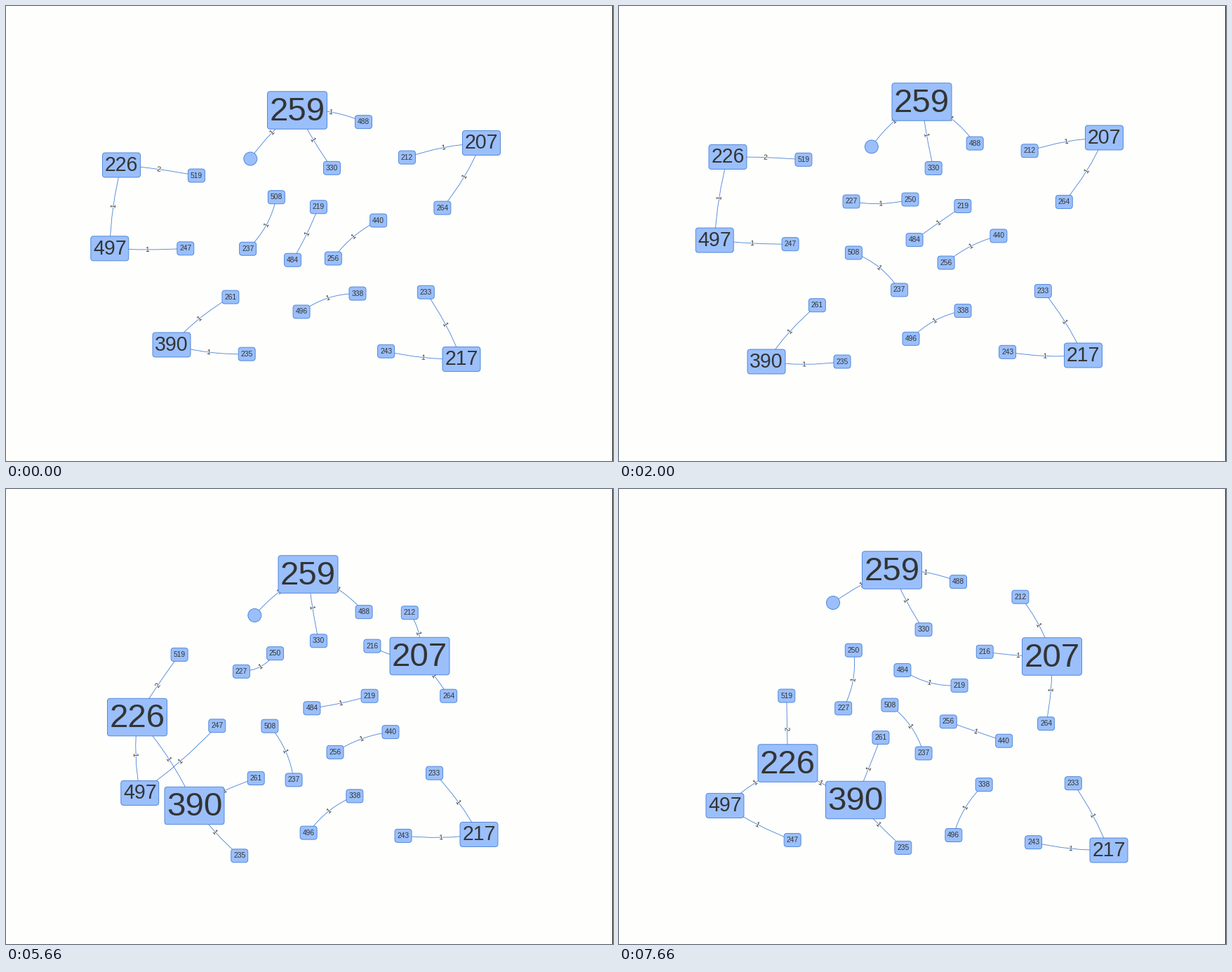
Animation, 865 px wide and 648 px high, one loop 8 s. Source, as a matplotlib script:

```python
import math
import numpy as np
import matplotlib.pyplot as plt
from matplotlib.animation import FuncAnimation
from matplotlib.patches import Circle, FancyBboxPatch, PathPatch, Rectangle
from matplotlib.path import Path
from matplotlib.patheffects import withStroke

W, H, DPI = 865, 648, 100
LOOP_MS, TICKS, STEPS = 8000, 100, 24
PT = 72 / DPI
FILL, LINE, INK, PAPER = "#9abffb", "#4a82d6", "#343434", "#fefefd"
CENTRE = np.array([W, H]) / 2

# Steps at which a new pair and two new links join the network.
PAIR_ADDED, LINKS_ADDED = 1, 16
# Poses: 0 start, 1 spread out, 2 pulled in, 3 late, 4 end.
PULLED, LAST = 2, 4

# Box width, box height, font size and link length in pixels.
SMALL, MID, BIG = (24, 19, 10.2, 84), (54, 35, 28.5, 108), (85, 53.5, 47.5, 96)

nodes, links = {}, []


def node(name, size=SMALL, grown=None, start=0, **place):
    nodes[name] = dict(size=size, grown=grown or size, start=start, **place)


def hub(name, *path, **kind):
    node(name, path=path, **kind)


def leaf(parent, name, *angles, slack=1, label="1", **kind):
    """Hang a node on its parent; slack scales the link while pulled in."""
    node(name, parent=parent, angles=angles, slack=slack, **kind)
    links.append((parent, name, label, nodes[name]["start"]))


def pair(a, b, angles, *path, start=0, slack=1):
    """Two equal nodes turning about the middle of their link."""
    hub(a, *path, start=start, twin=True)
    leaf(a, b, *angles, start=start, slack=slack)


hub("259", (415, 148.5), (431.5, 136.5), (430.5, 121.5), (398.5, 116.5), (389, 115.5), size=BIG)
leaf("259", "", 134, 151)
leaf("259", "488", 10, 38, 34, 17, 10)
leaf("259", "330", 59, 80, 81, 68, 62)

hub("226", (164.5, 226.5), (155, 215), (187, 325), (202, 382), (240.5, 390.5), size=MID, grown=BIG)
leaf("226", "519", 8, 2, -56, -70, -91, slack=1.12, label="2")
leaf("226", "497", 98, 99, 88, 77, 146, size=MID)
leaf("497", "247", 0, 3, -41, -51, 27, slack=1.35)

hub("207", (677.5, 195), (691.5, 187.5), (589.5, 238), (606, 240.5), (617, 238.5), size=MID, grown=BIG)
leaf("207", "212", 169, 170, 257, 257, 242, slack=.66)
leaf("207", "264", 121, 122, 54, 85, 95, slack=.73)
leaf("207", "216", 190, 190, 192, 172, 184, slack=.72, start=LINKS_ADDED)

hub("390", (236, 482.5), (210, 506.5), (268.5, 451), (317, 466), (337, 443), size=MID, grown=BIG)
leaf("390", "261", -39, -48, -24, -50, -68)
leaf("390", "235", 7, 0, 48, 47, 45)
links.append(("226", "390", "1", LINKS_ADDED))

hub("217", (649, 503), (674, 492), (698, 514.5), size=MID)
leaf("217", "233", 242, 234, 242)
leaf("217", "243", 186, 179, 186)

pair("508", "237", (119, 39, 66, 42, 55),
     (365, 309), (367, 378), (393, 376), (401, 361), (410, 342))
pair("219", "484", (116, 145, 168, 190, 195),
     (427, 324), (455.5, 309), (477, 303.5), (448.5, 297), (444.5, 269))
pair("440", "256", (140, 153, 160, 195, 199), (498.5, 332.5), (508.5, 360.5), (509, 345))
pair("496", "338", (-18, -59),
     (461, 422.5), (453, 454), (464, 463.5), (478.5, 471), (498.5, 457))
pair("227", "250", (24, -80),
     (388, 270), (373, 277), (359.5, 247), (341, 258.5), (327, 271),
     start=PAIR_ADDED, slack=.65)

plt.rcParams["font.family"] = "Liberation Sans"
fig = plt.figure(figsize=(W / DPI, H / DPI), dpi=DPI, facecolor=PAPER)
ax = fig.add_axes([0, 0, 1, 1])
ax.set(xlim=(0, W), ylim=(H, 0))
ax.axis("off")
fig.add_artist(Rectangle((864 / W, 0), 1 / W, 1, color="#1c1c1c", lw=0,
                         transform=fig.transFigure))
HALO = [withStroke(linewidth=1.5 * PT, foreground=PAPER)]


def pose_at(step):
    if step < LINKS_ADDED:
        return 1 - math.exp(-1.2 * step)
    return np.interp(step, [16, 17, 19, 23], [1.12, PULLED, 3, LAST])


def along(keys, pose):
    """Value at a pose, with the keys spread evenly over all poses."""
    return np.interp(pose, np.linspace(0, LAST, len(keys)), keys)


def size_at(name, step):
    return nodes[name]["grown" if step >= LINKS_ADDED else "size"]


def layout(step):
    pose = pose_at(step)
    spots = {}
    for name, item in nodes.items():
        if "path" in item:
            spots[name] = np.array([along(axis, pose) for axis in zip(*item["path"])])
            continue
        parent = item["parent"]
        length = size_at(parent, step)[3] + .4 * (item["size"][0] - SMALL[0])
        length *= np.interp(pose, [1, PULLED, 3], [1, item["slack"], 1])
        angle = math.radians(along(item["angles"], pose))
        arm = length * np.array([math.cos(angle), math.sin(angle)])
        if "twin" in nodes[parent]:
            spots[parent] = spots[parent] - arm / 2
        spots[name] = spots[parent] + arm
    return spots


def bend(middle, normal, others):
    """Linked neighbours push a link aside; a lone pair leans to the centre."""
    if others:
        push = sum((middle - p) / np.hypot(*(middle - p)) ** 3 for p in others)
        return np.clip(27000 * push @ normal, -12, 12)
    inward = CENTRE - middle
    return 7 * inward @ normal / max(np.hypot(*inward), 20)


def draw_link(a, b, label, others):
    delta = b - a
    normal = np.array([-delta[1], delta[0]]) / np.hypot(*delta)
    middle = (a + b) / 2
    shift = bend(middle, normal, others) * normal
    curve = Path([a, middle + 2 * shift, b], [Path.MOVETO, Path.CURVE3, Path.CURVE3])
    ax.add_patch(PathPatch(curve, fc="none", ec=LINE, lw=.85 * PT, zorder=1))
    if delta[0] < 0:
        delta = -delta
    ax.text(*(middle + shift), label, size=10.2 * PT, color=INK, ha="center", va="center",
            rotation=-math.degrees(math.atan2(delta[1], delta[0])),
            path_effects=HALO, zorder=2)


def draw_node(name, centre, size):
    x, y = centre
    w, h, font, _ = size
    style = dict(fc=FILL, ec=LINE, lw=.9 * PT, zorder=3)
    if not name:
        ax.add_patch(Circle((x, y), 9.5, **style))
        return
    ax.add_patch(FancyBboxPatch((x - w / 2, y - h / 2), w, h,
                                boxstyle="round,pad=0,rounding_size=4", **style))
    ax.text(x, y + .295 * font, name, size=font * PT, color=INK,
            ha="center", va="baseline", zorder=4)


def draw(tick):
    for artist in [*ax.patches, *ax.texts]:
        artist.remove()
    # The picture holds between steps, so each tick shows the step reached by its end.
    step = min((tick + 1) * STEPS // TICKS, STEPS - 1)
    spots = layout(step)
    live = [link for link in links if step >= link[3]]
    for a, b, label, _ in live:
        near = {n for link in live for n in link[:2] if {a, b} & set(link[:2])}
        draw_link(spots[a], spots[b], label, [spots[n] for n in sorted(near - {a, b})])
    for name, item in nodes.items():
        if step >= item["start"]:
            draw_node(name, spots[name], size_at(name, step))
    return [*ax.patches, *ax.texts]


anim = FuncAnimation(fig, draw, frames=TICKS, init_func=lambda: draw(0),
                     interval=LOOP_MS // TICKS, repeat=True, repeat_delay=0)
plt.show()
```
